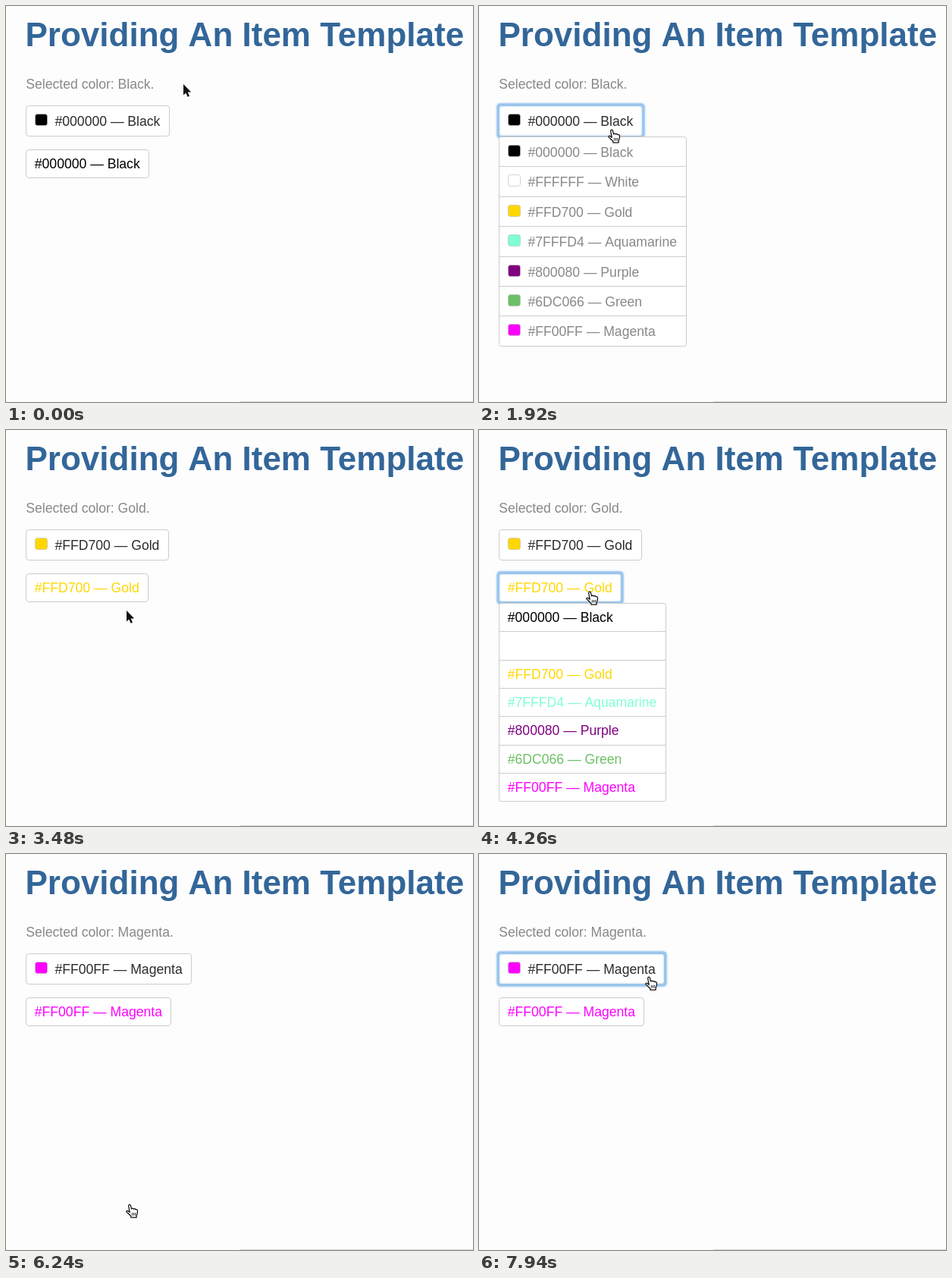
An HTML page with a canvas for the animation above (8 s loop, 616 by 522 pixels).

```html
<!DOCTYPE html>
<html lang="en">
<head>
<meta charset="utf-8">
<title>Item template</title>
<style>
  html, body { margin: 0; width: 616px; height: 522px; overflow: hidden; background: #fdfdfd; }
  canvas { display: block; }
</style>
</head>
<body>
<canvas id="stage" width="616" height="522"></canvas>
<script>
const ctx = document.getElementById('stage').getContext('2d');
const LOOP = 8000, STEP = 70, LEFT = 26;
const FAMILY = '"Liberation Sans", Arial, sans-serif';
const BODY = '17.6px ' + FAMILY;
const TITLE = 'bold 44px ' + FAMILY;

const colors = [
  ['#000000', 'Black'], ['#FFFFFF', 'White'], ['#FFD700', 'Gold'],
  ['#7FFFD4', 'Aquamarine'], ['#800080', 'Purple'],
  ['#6DC066', 'Green'], ['#FF00FF', 'Magenta']
].map(([hex, name]) => ({ hex, name, label: `${hex} — ${name}` }));
const [BLACK, , GOLD, AQUA, , , MAGENTA] = colors;

// The first picker shows swatches, the second colors its text.
const pickers = [
  { y: 131, h: 40, baseline: 158, menuY: 172, row: 39.4, rowBaseline: 199,
    pad: 51, textX: 64.5, swatch: true,
    open: [850, 2910], focus: [[850, 2410], [7940, LOOP]] },
  { y: 189, h: 37, baseline: 214, menuY: 228, row: 37.35, rowBaseline: 253,
    pad: 24, textX: 37.8, swatch: false,
    open: [4120, 6170], focus: [[4120, 6100]] }
];

const start = { x: 234, y: 103 };
const moves = [
  { at: 70, steps: 5, x: 175, y: 149 },
  { at: 1850, steps: 9, x: 172, y: 263 },
  { at: 3410, steps: 4, x: 146, y: 213 },
  { at: 5260, steps: 8, x: 163, y: 462 },
  { at: 6810, steps: 10, x: 224, y: 162 }
];

const arrow = new Path2D('M0 0V14.5L3.3 11.4L5.6 16.8L8 15.8L5.7 10.5H10.2Z');
const hand = new Path2D('M5 11L3.6 3.2C3.2 .8 5.6 .4 6.1 2.4L7.2 6.6C8 5.6 9.4 5.8 9.8 6.9' +
  'C10.6 6.1 12 6.4 12.3 7.5C13.2 6.9 14.6 7.4 14.7 9C14.9 12 14.2 13 13.4 15V17.4H6.6V16' +
  'C5.4 14.8 3.6 12.4 1.2 10.6C.2 9.4 1.8 8.4 3 9.2Z');
const fingers = new Path2D('M8 11.5v3.5M10 11.5v3.5M12 11.5v3.5');

const within = (t, [from, to]) => t >= from && t < to;
const smooth = p => p * p * (3 - 2 * p);
const inside = (p, b) => p.x >= b.x && p.x <= b.x + b.w && p.y >= b.y && p.y <= b.y + b.h;
const selectedAt = t => t < pickers[0].open[1] ? BLACK : t < pickers[1].open[1] ? GOLD : MAGENTA;

function text(string, x, y, color, font = BODY) {
  ctx.font = font;
  ctx.fillStyle = color;
  ctx.fillText(string, x, y);
}

function box({ x, y, w, h }, radius, fill, stroke) {
  ctx.beginPath();
  ctx.roundRect(x + .5, y + .5, w - 1, h - 1, radius);
  ctx.fillStyle = fill;
  ctx.fill();
  ctx.lineWidth = 1;
  ctx.strokeStyle = stroke;
  ctx.stroke();
}

function widthFor(picker, item) {
  ctx.font = BODY;
  return Math.round(ctx.measureText(item.label).width + picker.pad);
}

const buttonBox = (p, item) => ({ x: LEFT, y: p.y, w: widthFor(p, item), h: p.h + 1 });
const menuBox = p => ({ x: LEFT, y: p.menuY, w: widthFor(p, AQUA), h: Math.round(p.row * 7) + 1 });

function swatch(y, hex) {
  box({ x: 38, y, w: 17, h: 16 }, 3, hex, 'rgba(190,190,190,.65)');
}

function focusRing({ x, y, w, h }) {
  ctx.save();
  ctx.shadowColor = 'rgba(110,175,235,.7)';
  ctx.shadowBlur = 3;
  ctx.beginPath();
  ctx.roundRect(x - 1, y - 1, w + 2, h + 2, 3);
  ctx.lineWidth = 3;
  ctx.strokeStyle = '#98c6ee';
  ctx.stroke();
  ctx.restore();
}

function drawButton(picker, item, t) {
  const b = buttonBox(picker, item);
  box(b, 3.5, '#fff', '#ccc');
  if (picker.focus.some(span => within(t, span))) focusRing(b);
  if (picker.swatch) swatch(142, item.hex);
  text(item.label, picker.textX, picker.baseline, picker.swatch ? '#2b2b2b' : item.hex);
}

function drawMenu(picker) {
  const b = menuBox(picker);
  box(b, 3, '#fff', '#ccc');
  colors.forEach((item, i) => {
    const offset = Math.round(i * picker.row);
    if (i) {
      ctx.fillStyle = '#ccc';
      ctx.fillRect(b.x, b.y + offset, b.w, 1);
    }
    if (picker.swatch) swatch(183 + offset, item.hex);
    text(item.label, picker.textX, picker.rowBaseline + offset, picker.swatch ? '#888' : item.hex);
  });
}

function pointerAt(t) {
  let from = start, moving = t < moves[0].at;
  for (const move of moves) {
    if (t < move.at) break;
    const step = Math.floor((t - move.at) / STEP) + 1;
    if (step < move.steps) {
      const p = smooth(step / move.steps);
      return { x: from.x + (move.x - from.x) * p, y: from.y + (move.y - from.y) * p, moving: true };
    }
    from = move;
  }
  return { x: from.x, y: from.y, moving };
}

function drawPointer(t, item) {
  const p = pointerAt(t);
  const targets = pickers.map(k => buttonBox(k, item))
    .concat(pickers.filter(k => within(t, k.open)).map(menuBox));
  // A resting pointer keeps its hand after the menu beneath it closes.
  const isHand = !p.moving || targets.some(b => inside(p, b));

  ctx.save();
  ctx.translate(Math.round(p.x), Math.round(p.y));
  ctx.lineJoin = 'round';
  if (isHand) {
    ctx.scale(1.06, 1.04);
    ctx.translate(-4.8, -1);
    ctx.fillStyle = '#fff';
    ctx.strokeStyle = '#111';
    ctx.lineWidth = 1.2;
    ctx.fill(hand);
    ctx.stroke(hand);
    ctx.lineWidth = .9;
    ctx.stroke(fingers);
  } else {
    ctx.fillStyle = '#111';
    ctx.strokeStyle = '#fff';
    ctx.lineWidth = 2;
    ctx.stroke(arrow);
    ctx.fill(arrow);
  }
  ctx.restore();
}

function draw(t) {
  const item = selectedAt(t);
  ctx.fillStyle = '#fdfdfd';
  ctx.fillRect(0, 0, 616, 522);
  text('Providing An Item Template', 25.5, 53, '#336699', TITLE);
  text(`Selected color: ${item.name}.`, 26.3, 109, '#888');
  ctx.fillStyle = '#d2d2d2';
  ctx.fillRect(309, 521, 307, 1);

  pickers.forEach(p => drawButton(p, item, t));
  pickers.filter(p => within(t, p.open)).forEach(drawMenu);
  drawPointer(t, item);
}

function tick() {
  draw(performance.now() % LOOP);
  requestAnimationFrame(tick);
}
tick();
</script>
</body>
</html>
```
